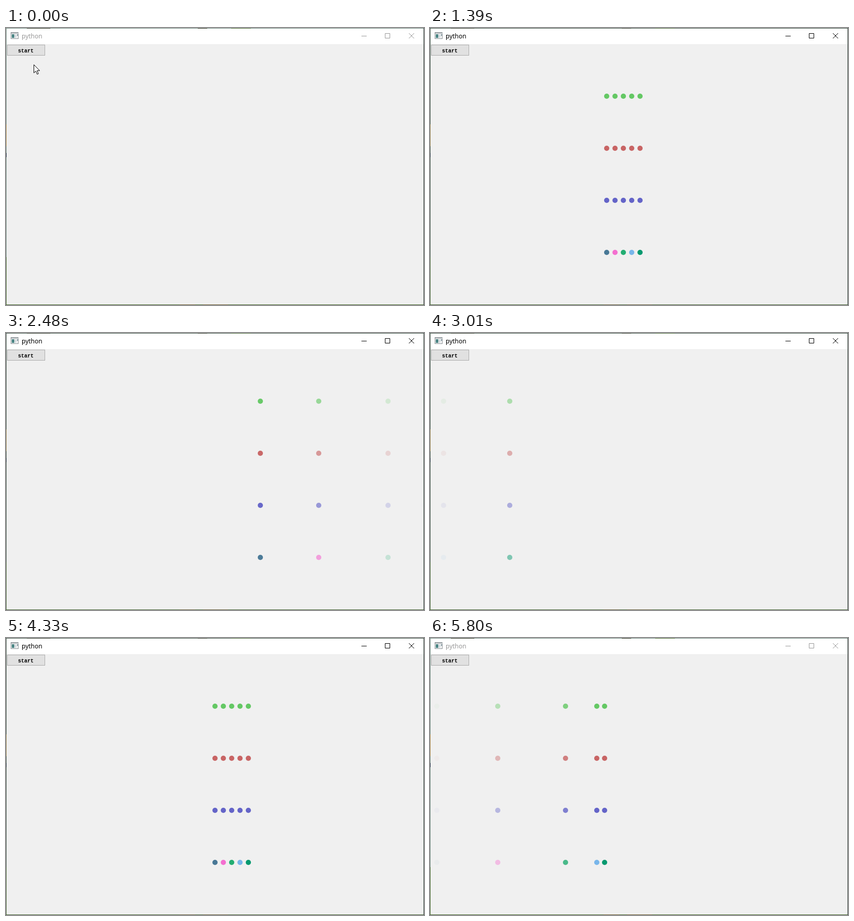
Recreate the animation shown at these times as an HTML page. Size 802 by 532 pixels, loop 5.89 s.

```html
<!DOCTYPE html>
<html lang="en">
<head>
<meta charset="utf-8">
<title>Loading dots</title>
<style>
  html, body { margin: 0; width: 100%; height: 100%; overflow: hidden; }
  svg { display: block; width: 802px; height: 532px; }
  .title { font: 12px "Noto Sans", "Open Sans", sans-serif; }
  .label { font: bold 10px "Liberation Mono", "DejaVu Sans Mono", monospace; }
</style>
</head>
<body>
<svg viewBox="0 0 802 532">
  <rect id="border" width="802" height="532"/>
  <g id="desktop">
    <path d="M40 0h45v1h-45zM368 0h18v1h-18z" fill="#1d2412"/>
    <path d="M432 0h38v1h-38zM0 440h1v92h-1zM0 531h802v1h-802z" fill="#47682f"/>
    <path d="M333 531h30v1h-30zM378 531h48v1h-48z" fill="#6b5a30"/>
    <path d="M0 185h1v42h-1z" fill="#a98748"/>
    <path d="M0 240h1v8h-1z" fill="#17233c"/>
    <path d="M801 0h1v532h-1z" fill="#3e4b45"/>
  </g>
  <rect x="1" y="1" width="800" height="30" fill="#fff"/>
  <rect x="1" y="31" width="800" height="500" fill="#f0f0f0"/>

  <g shape-rendering="crispEdges">
    <rect x="9.5" y="8.5" width="14" height="12" fill="#f7f7f7" stroke="#8c9296"/>
    <rect x="10" y="9" width="14" height="2" fill="#b4babd"/>
    <rect x="11" y="12" width="5" height="7" fill="#4c8585"/>
    <rect x="17" y="12" width="3" height="7" fill="#d3d9dc"/>
    <rect x="21" y="12" width="2" height="3" fill="#8aa0aa"/>
  </g>
  <text id="title" class="title" x="30" y="20">python</text>
  <g id="controls" fill="none">
    <path d="M682 15.5h10M727.5 10.5h9v9h-9z"/>
    <path d="M773 10l10 10M783 10l-10 10"/>
  </g>

  <rect id="button" x="2.5" y="32.5" width="72" height="20"/>
  <text class="label" x="23" y="47">start</text>
  <g id="dots"></g>
  <path id="cursor" d="M.5 .5v15.7l3.6-3.4 2.7 6 2.4-1-2.6-5.9h5z" fill="#fff" stroke="#000"/>
</svg>
<script>
const LOOP = 5890, FRAME = 77.4;
const DELAY = 120, FAST = 400, SLOW = 1200, CYCLE = 2 * FAST + SLOW + 4 * DELAY;
const rows = [
  Array(5).fill("#64c864"),
  Array(5).fill("#c86464"),
  Array(5).fill("#6464c8"),
  ["#487896", "#f46fd0", "#23ad72", "#78b6ea", "#05996f"]
];
const pace = [[0, -358], [18, 1023], [27, 1713], [39, 2653], [48, 3345], [63, 4517], [75, 5473]];
const pointer = [[0, 53, 70], [2, 52, 62], [4, 47, 45], [8, 47, 45], [11, 280, 90], [14, 767, 180]];

const $ = id => document.getElementById(id);
const set = (el, attrs) => {
  for (const name in attrs) el.setAttribute(name, attrs[name]);
};

const dots = [];
rows.forEach((colors, row) => colors.forEach((fill, column) => {
  const el = document.createElementNS("http://www.w3.org/2000/svg", "circle");
  set(el, { cy: 131 + row * 100, r: 5, fill });
  $("dots").append(el);
  dots.push({ el, delay: (4 - column) * DELAY });
}));

function interpolate(points, at, field = 1) {
  let i = 1;
  while (i < points.length - 1 && at > points[i][0]) i++;
  const a = points[i - 1], b = points[i];
  return a[field] + (b[field] - a[field]) * (at - a[0]) / (b[0] - a[0]);
}

const ease = t => 1 - (1 - t ** 1.6) ** 2.15;

function dotState(s) {
  if (s < 0 || s > 2 * FAST + SLOW) return { cx: 0, opacity: 0 };
  if (s < FAST) {
    const p = ease(s / FAST);
    return { cx: 320 * p, opacity: p };
  }
  if (s < FAST + SLOW) return { cx: 320 + 160 * (s - FAST) / SLOW, opacity: 1 };
  const p = ease((s - FAST - SLOW) / FAST);
  return { cx: 480 + 320 * p, opacity: 1 - p };
}

function draw(time) {
  const step = Math.floor((time + 17) / FRAME);
  const phase = interpolate(pace, step);
  const active = step >= 5 && step < 75;
  const hover = step >= 3 && step < 10;
  const pressed = step === 4;

  for (const { el, delay } of dots) {
    const state = dotState(phase < 0 ? -1 : phase % CYCLE - delay);
    state.cx = Math.round(state.cx);
    set(el, state);
  }

  set($("border"), { fill: active ? "#43574b" : "#6f8a80" });
  set($("desktop"), { opacity: active ? 0.75 : 1 });
  set($("title"), { fill: active ? "#000" : "#999" });
  set($("controls"), { stroke: active ? "#000" : "#999" });
  set($("button"), {
    fill: pressed ? "#cce4f7" : hover ? "#e5f1fb" : "#e1e1e1",
    stroke: pressed ? "#005499" : hover ? "#0078d7" : "#adadad"
  });
  set($("cursor"), {
    visibility: step < 15 ? "visible" : "hidden",
    transform: `translate(${interpolate(pointer, step, 1)} ${interpolate(pointer, step, 2)})`
  });
}

const start = performance.now();
function tick() {
  draw((performance.now() - start) % LOOP);
  requestAnimationFrame(tick);
}
tick();
</script>
</body>
</html>
```
